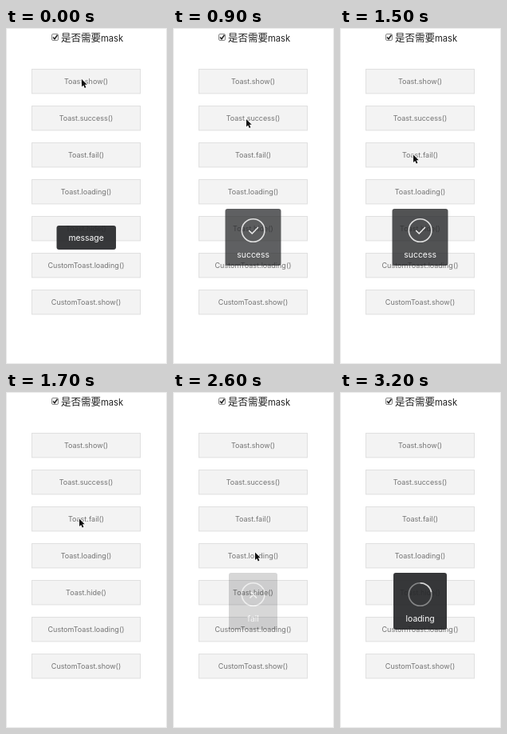
An HTML page with a canvas that plays this animation: 202 by 420 pixels, repeating every 3.3 s.

```html
<!DOCTYPE html>
<html lang="zh">
<head>
<meta charset="utf-8">
<style>
html, body { margin: 0; width: 100%; height: 100%; overflow: hidden; background: #fff; }
canvas { display: block; width: 202px; height: 420px; }
</style>
</head>
<body>
<canvas></canvas>
<script>
const LOOP = 3300, STEP = 100, WIDTH = 202, HEIGHT = 420;
const ratio = window.devicePixelRatio || 1;
const main = prepare(document.querySelector('canvas'));
// Toasts are drawn here first, so that each fades as one group
const layer = prepare(document.createElement('canvas'));
let c = main;

const buttons = ['Toast.show()', 'Toast.success()', 'Toast.fail()', 'Toast.loading()',
  'Toast.hide()', 'CustomToast.loading()', 'CustomToast.show()'];

const toasts = [
  { label: 'message', x: 63.5, w: 74.5, y: 247, h: 30, from: -500, to: 730 },
  { label: 'success', x: 65.5, w: 70, y: 226, h: 71, from: 700, to: 1630, icon: check },
  { label: 'fail', x: 70, w: 61, y: 226, h: 71, from: 1700, to: 2630, icon: cross },
  { label: 'loading', x: 67, w: 67, y: 226, h: 71, from: 2700, to: 4000, icon: spinner }
];

// Pointer stops: time, x, y
const stops = [[0, 95, 64], [200, 95, 64], [600, 92, 114], [1100, 92, 114],
  [1400, 92, 158.5], [1900, 92, 158.5], [2100, 107, 197], [2300, 103, 200.5], [LOOP, 103, 200.5]];
const POINTER_END = 3050;

const clamp = v => Math.max(0, Math.min(1, v));

function prepare(canvas) {
  canvas.width = WIDTH * ratio;
  canvas.height = HEIGHT * ratio;
  const context = canvas.getContext('2d');
  context.scale(ratio, ratio);
  return context;
}

function text(s, x, y, size, color, align = 'center', family = 'Inter, sans-serif') {
  c.font = `${size}px ${family}`;
  c.textAlign = align;
  c.fillStyle = color;
  c.fillText(s, x, y);
}

function line(points, color, width) {
  c.beginPath();
  points.forEach(p => c.lineTo(...p));
  c.strokeStyle = color;
  c.lineWidth = width;
  c.stroke();
}

function arc(start, end, color) {
  c.beginPath();
  c.arc(100.6, 253, 14.3, start, end);
  c.strokeStyle = color;
  c.lineWidth = 1.6;
  c.stroke();
}

function check() {
  arc(0, 7, '#dcdcdc');
  line([[95.2, 253], [99.2, 257], [107, 249]], '#eee', 1.5);
}

function cross() {
  arc(0, 7, '#dcdcdc');
  line([[96.5, 249], [105, 257.5]], '#eee', 1.6);
  line([[105, 249], [96.5, 257.5]], '#eee', 1.6);
}

function spinner(t) {
  const turn = (t - 3200) / 1000 * 2 * Math.PI;
  arc(0, 7, '#858687');
  arc(turn - Math.PI / 2, turn - 0.2, '#d4d4d4');
}

function page() {
  c.fillStyle = '#fff';
  c.fillRect(0, 0, WIDTH, HEIGHT);
  c.lineWidth = 1;
  c.strokeStyle = '#e9e9e9';
  c.strokeRect(0.5, 0.5, WIDTH - 1, HEIGHT - 1);

  c.beginPath();
  c.roundRect(57.5, 7.5, 8, 8, 1.5);
  c.fillStyle = '#f4f4f4';
  c.fill();
  c.strokeStyle = '#8a8a8a';
  c.stroke();
  line([[59, 11.5], [61, 13.8], [64.5, 8.8]], '#222', 1.5);
  text('是否需要', 69, 16.7, 12.5, '#222', 'left', '"Noto Sans CJK SC", "Noto Sans CJK", sans-serif');
  text('mask', 119, 16.7, 11.2, '#222', 'left');

  buttons.forEach((label, i) => {
    const y = 51.5 + i * 46;
    c.fillStyle = '#f3f3f3';
    c.fillRect(32.5, y, 136, 30.4);
    c.lineWidth = 1;
    c.strokeStyle = '#e0e0e0';
    c.strokeRect(32.5, y, 136, 30.4);
    text(label, 100.5, y + 18.1, 9, '#737373');
  });
}

function toast(o, t) {
  const alpha = Math.min(clamp((t - o.from) / 250), clamp((o.to - t) / 150));
  if (!alpha) return;
  c = layer;
  c.clearRect(0, 0, WIDTH, HEIGHT);
  c.beginPath();
  c.roundRect(o.x, o.y, o.w, o.h, 3);
  c.fillStyle = 'rgba(38,40,42,.92)';
  c.fill();
  if (o.icon) o.icon(t);
  text(o.label, 100.6, o.icon ? 286.7 : 266, 10.4, '#fff');
  c = main;
  c.globalAlpha = alpha;
  c.drawImage(layer.canvas, 0, 0, WIDTH, HEIGHT);
  c.globalAlpha = 1;
}

function pointer(t) {
  if (t > POINTER_END) return;
  const i = stops.findIndex(s => s[0] > t);
  const [t0, x0, y0] = stops[i - 1], [t1, x1, y1] = stops[i];
  const k = (t - t0) / (t1 - t0);
  c.save();
  c.translate(x0 + (x1 - x0) * k, y0 + (y1 - y0) * k);
  c.scale(0.9, 0.9);
  c.beginPath();
  [[0, 0], [0, 10.5], [2.4, 8.3], [4.2, 12.2], [6, 11.4], [4.3, 7.6], [7.5, 7.4]]
    .forEach(p => c.lineTo(...p));
  c.closePath();
  c.strokeStyle = '#fff';
  c.lineWidth = 1.4;
  c.stroke();
  c.fillStyle = '#111';
  c.fill();
  c.restore();
}

function draw() {
  const t = Math.floor(performance.now() % LOOP / STEP) * STEP;
  page();
  toasts.forEach(o => toast(o, t));
  pointer(t);
  requestAnimationFrame(draw);
}
draw();
</script>
</body>
</html>
```
